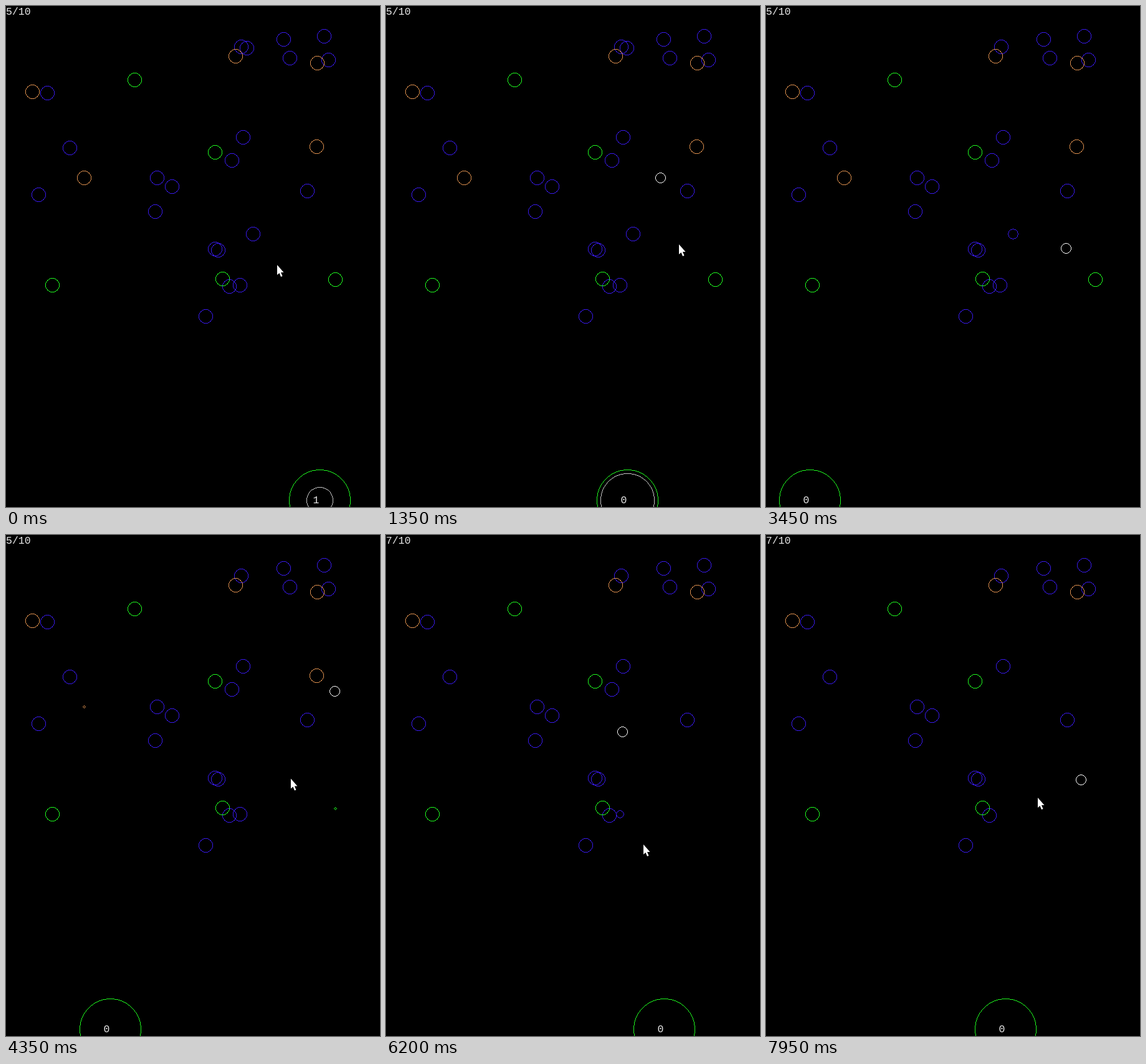
These frames come from a looping animation (600x803 px, 8000 ms). An HTML page with a canvas:

```html
<!DOCTYPE html>
<html lang="en">
<head>
<meta charset="utf-8">
<style>
  html, body { margin: 0; width: 100%; height: 100%; overflow: hidden; background: #000; }
  canvas { display: block; }
</style>
</head>
<body>
<canvas id="stage" width="600" height="803"></canvas>
<script>
const ctx = document.getElementById('stage').getContext('2d');
const LOOP = 8000, GRAVITY = 150, WALL = 591, FADE = 850;
const PEG_R = 11, BALL_R = 8, BUCKET_R = 49, BUCKET_Y = 792;
const BLUE = '#3719e6', GREEN = '#1ef51e', ORANGE = '#d88c4c';

const layout = {
  [BLUE]: [[377, 65], [386, 67], [445, 53], [455, 83], [510, 48], [517, 86], [66, 139],
    [102, 227], [52, 302], [380, 210], [362, 247], [242, 275], [266, 289], [239, 329],
    [483, 296], [396, 365], [335, 389], [340, 391], [358, 449], [375, 447], [320, 497]],
  [ORANGE]: [[125, 275], [368, 80], [499, 91], [42, 137], [498, 225]],
  [GREEN]: [[206, 118], [335, 234], [347, 437], [74, 447], [528, 438]]
};

// Launch, peg bounces and end: time, x, y. An x beyond the wall is folded back.
const flight = [
  [15, 516, 793], [2190, 392, 86], [3195, 412, 353], [3620, 526, 417],
  [4430, 513, 237], [5790, 382, 428], [6446, 378, 259], [LOOP, 495, 402]
];
const wallBounceAfter = [3, 4, 6];
const cursorPath = [[0, 435, 415], [1350, 470, 382], [5250, 453, 393], [6200, 413, 496], [7950, 436, 421], [LOOP, 436, 421]];

const lerp = (a, b, k) => a + (b - a) * k;

// Every peg that a bounce touches is cleared; the green one takes an orange along.
const bounces = flight.slice(1, -1);
const pegs = Object.entries(layout).flatMap(([color, spots]) => spots.map(([x, y]) => {
  const touch = bounces.find(([, bx, by]) => Math.hypot(bx - x, by - y) < PEG_R + BALL_R + 4);
  return { color, x, y, hit: touch ? touch[0] : Infinity };
}));
const bonus = pegs.find(p => p.color === ORANGE);
bonus.hit = Math.min(...pegs.filter(p => p.color === GREEN).map(p => p.hit));

function segment(path, t) {
  const i = Math.max(0, path.findIndex(knot => knot[0] > t) - 1);
  const [t0, x0, y0] = path[i], [t1, x1, y1] = path[i + 1];
  return { i, k: (t - t0) / (t1 - t0), span: (t1 - t0) / 1000, x0, y0, x1, y1 };
}

function ballAt(t) {
  const { i, k, span, x0, y0, x1, y1 } = segment(flight, t);
  const x = lerp(x0, wallBounceAfter.includes(i) ? 2 * WALL - x1 : x1, k);
  return {
    x: x > WALL ? 2 * WALL - x : x,
    y: lerp(y0, y1, k) - GRAVITY / 2 * span * span * k * (1 - k)
  };
}

// The bucket runs to and fro at a steady speed.
function bucketAt(t) {
  const phase = (t - 290) / 3290;
  return lerp(547, 51, Math.abs(phase - 2 * Math.round(phase / 2)));
}

// One-pixel circle without smoothing
function ring(cx, cy, r, color) {
  cx = Math.round(cx);
  cy = Math.round(cy);
  ctx.fillStyle = color;
  for (let i = 0; i <= r * Math.SQRT1_2 + .5; i++) {
    const j = Math.round(Math.sqrt(Math.max(0, r * r - i * i)));
    for (const [dx, dy] of [[i, j], [j, i]]) {
      for (const sx of [-1, 1]) {
        for (const sy of [-1, 1]) ctx.fillRect(cx + sx * dx, cy + sy * dy, 1, 1);
      }
    }
  }
}

function label(text, x, y) {
  ctx.fillStyle = '#e8e8e8';
  ctx.fillText(text, x, y);
}

function drawBucket(t) {
  const x = Math.floor(bucketAt(t));
  const inner = 21 + t * .0163;
  if (inner < BUCKET_R) ring(x, BUCKET_Y, inner, '#c4c4c4');
  ring(x, BUCKET_Y, BUCKET_R, GREEN);
  label(t < 50 ? '1' : '0', x - 10.5, 797);
}

function drawCursor(t) {
  if (t > 1900 && t < 4300) return;
  const { k, x0, y0, x1, y1 } = segment(cursorPath, t);
  ctx.save();
  ctx.translate(lerp(x0, x1, k), lerp(y0, y1, k));
  ctx.fillStyle = '#fff';
  ctx.fill(new Path2D('M0 0V16L3.5 13L6 19L8.5 18L6 12H10.5Z'));
  ctx.restore();
}

function draw(t) {
  ctx.fillStyle = '#000';
  ctx.fillRect(0, 0, 600, 803);
  ctx.font = '16.5px "Liberation Mono", monospace';
  for (const { color, x, y, hit } of pegs) {
    const left = 1 - Math.max(0, t - hit) / FADE;
    if (left > 0) ring(x, y, PEG_R * left, color);
  }
  if (t > flight[0][0]) {
    const { x, y } = ballAt(t);
    ring(x, y, BALL_R, '#f2f2f2');
  }
  drawBucket(t);
  const cleared = pegs.filter(p => p.color === ORANGE && t >= p.hit + FADE).length;
  label(`${5 + cleared}/10`, 0, 14);
  drawCursor(t);
}

const start = performance.now();
function tick() {
  draw((performance.now() - start) % LOOP);
  requestAnimationFrame(tick);
}
tick();
</script>
</body>
</html>
```
